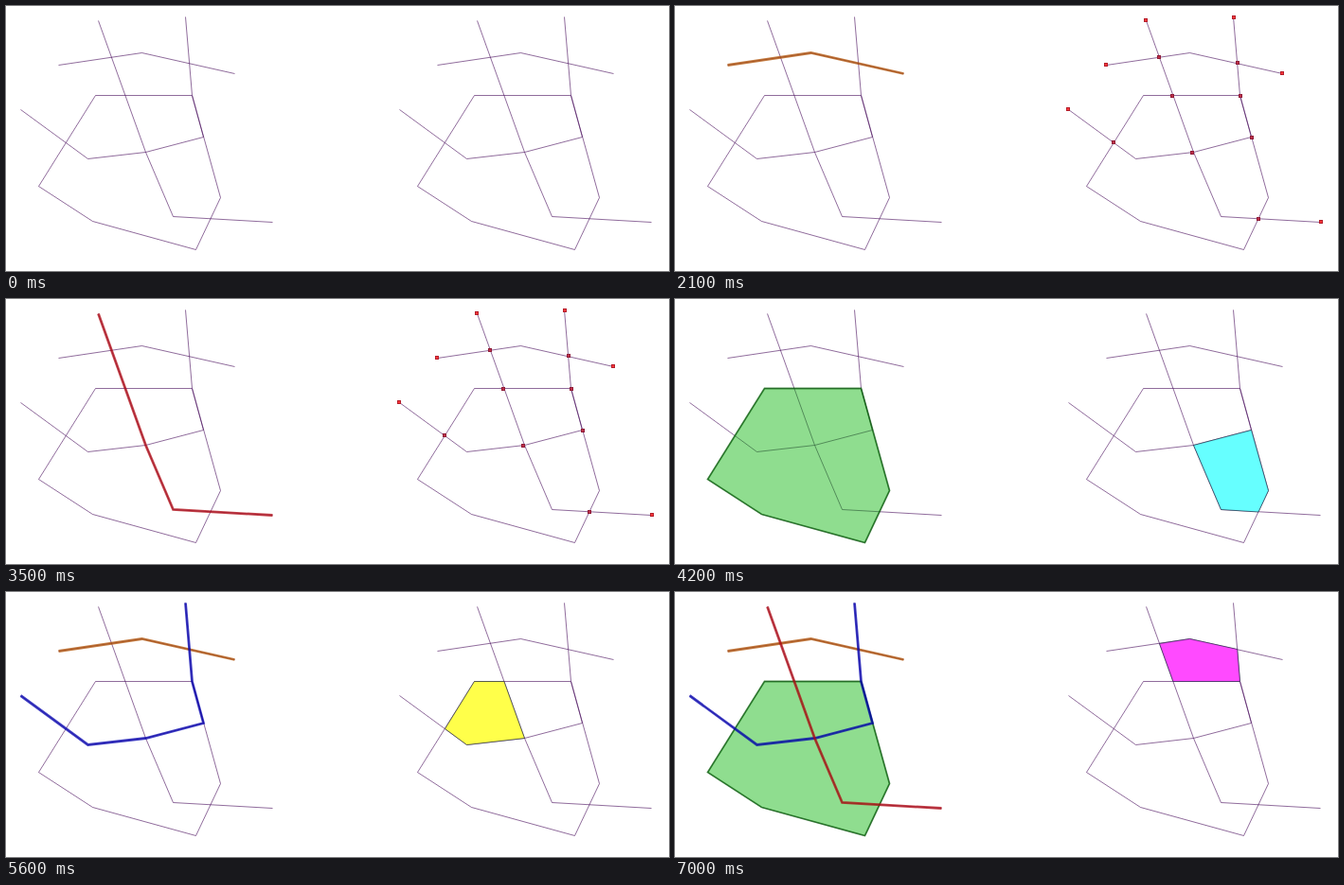
An HTML page for the animation above (7.7 s loop, 700x280 px).

```html
<!DOCTYPE html>
<html lang="en">
<head>
<meta charset="utf-8">
<title>Lines, nodes and polygons</title>
<style>
  html, body { margin: 0; width: 100%; height: 100%; overflow: hidden; background: #fff; }
  svg { display: block; width: 700px; height: 280px; }
  .thin { fill: none; stroke: #460a5a; stroke-opacity: .6; stroke-width: 1; }
  .thick { fill: none; stroke-opacity: .75; stroke-width: 2.8; }
  .area { fill: #00b200; fill-opacity: .44; stroke: #006400; stroke-opacity: .65; stroke-width: 1.8; }
  .cell { stroke: #102038; stroke-opacity: .6; stroke-width: 1; }
  .node { fill: #ff3838; stroke: #b41e2c; }
  .cross { fill: #c03048; stroke: #901c38; }

  /* Eleven steps of 700 ms */
  .show { visibility: hidden; animation: 7700ms step-end infinite; }
  .orange { stroke: #b05000; animation-name: orange; }
  .blue { stroke: #0000b2; animation-name: blue; }
  .red { stroke: #b20810; animation-name: red; }
  .area { animation-name: area; }
  .nodes { animation-name: nodes; }
  .cell { animation-name: cell; animation-delay: calc(var(--step) * 700ms - 7700ms); }

  @keyframes orange {
    0%, 18.181%, 36.363% { visibility: hidden; }
    9.09%, 27.272%, 63.636%, 100% { visibility: visible; }
  }
  @keyframes blue {
    0%, 45.454% { visibility: hidden; }
    36.363%, 72.727%, 100% { visibility: visible; }
  }
  @keyframes red {
    0%, 54.545% { visibility: hidden; }
    45.454%, 81.818%, 100% { visibility: visible; }
  }
  @keyframes area {
    0%, 63.636% { visibility: hidden; }
    54.545%, 90.909%, 100% { visibility: visible; }
  }
  @keyframes nodes {
    0%, 18.181%, 54.545%, 100% { visibility: hidden; }
    9.09%, 27.272% { visibility: visible; }
  }
  @keyframes cell {
    0% { visibility: visible; }
    9.09%, 100% { visibility: hidden; }
  }
</style>
</head>
<body>
<svg viewBox="0 0 700 280">
  <defs>
    <path id="orange" d="M55 62 143 49 241 71"/>
    <path id="blue" d="M15 109 86 161 147 154 208 138 196 94 189 11"/>
    <path id="red" d="M97 15 147 154 176 222 281 228"/>
    <path id="ring" d="M94 94H196L226 202 200 257 91 227 34 190Z"/>
    <g id="net" class="thin">
      <use href="#orange"/><use href="#blue"/><use href="#red"/><use href="#ring"/>
    </g>
  </defs>

  <g transform="translate(.5 .5)">
    <use href="#net"/>
    <use href="#ring" class="area show"/>
    <use href="#orange" class="thick orange show"/>
    <use href="#blue" class="thick blue show"/>
    <use href="#red" class="thick red show"/>
  </g>

  <g transform="translate(400.5 .5)">
    <use href="#net"/>
    <path class="cell show" style="--step:6" fill="#66ffff" d="M147 154 208 138 226 202 215.5 224.5 176 222Z"/>
    <path class="cell show" style="--step:7" fill="#69d469" d="M63 144 86 161 147 154 176 222 215.5 224.5 200 257 91 227 34 190Z"/>
    <path class="cell show" style="--step:8" fill="#ffff4a" d="M94 94H125.4L147 154 86 161 63 144Z"/>
    <path class="cell show" style="--step:9" fill="#c94a4a" d="M125.4 94H196L208 138 147 154Z"/>
    <path class="cell show" style="--step:10" fill="#ff4aff" d="M111 54 143 49 193.2 60 196 94H125.4Z"/>
  </g>

  <g id="nodes" class="nodes show"></g>
</svg>
<script>
  const ends = [[497, 15], [590, 12], [455, 62], [641, 71], [415, 109], [682, 228]];
  const crossings = [[511, 54], [594, 60], [525, 95], [597, 95], [463, 144], [546, 155], [609, 139], [616, 225]];

  const square = type => ([x, y]) =>
    `<rect class="${type}" x="${x - 1.5}" y="${y - 1.5}" width="3" height="3"/>`;

  document.getElementById('nodes').innerHTML =
    ends.map(square('node')).join('') + crossings.map(square('cross')).join('');
</script>
</body>
</html>
```
